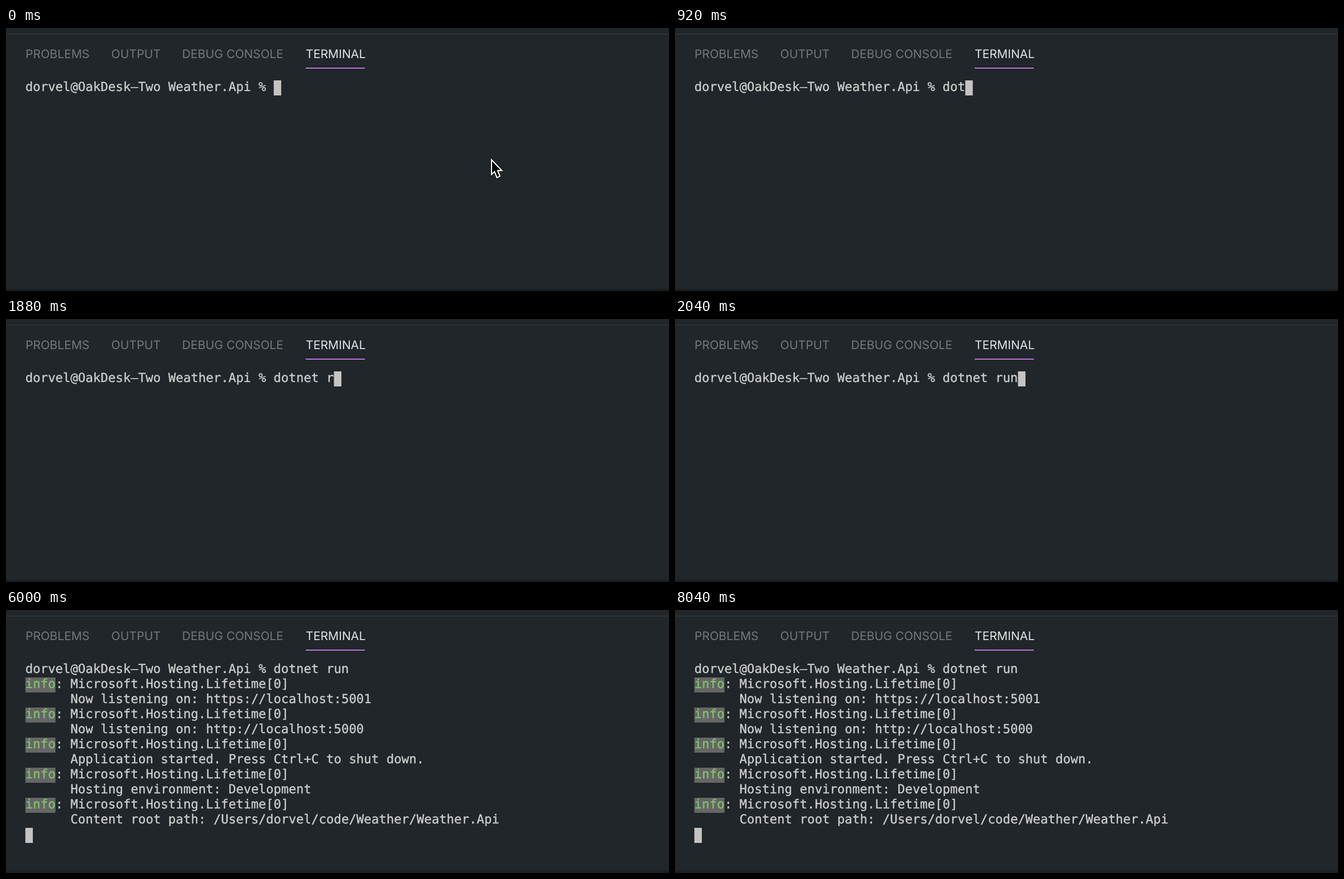
Recreate the animation shown at these times as an HTML page. Size 1188 by 472 pixels, loop 8080 ms.

```html
<!DOCTYPE html>
<html lang="en">
<head>
<meta charset="utf-8">
<title>Terminal</title>
<style>
html, body { margin: 0; width: 100%; height: 100%; overflow: hidden; background: #202629; }
svg { display: block; }
text { white-space: pre; text-rendering: geometricPrecision; }
#tabs text { font: 21.2px Inter, Roboto, sans-serif; fill: #73787a; }
#tabs .on { fill: #e4e5e6; }
#term text {
  font: 22.4px "DejaVu Sans Mono", "Liberation Mono", monospace;
  fill: #cccccc; stroke: #cccccc; stroke-width: 0.4px;
}
#term .info { fill: #82c26c; stroke: #82c26c; }
</style>
</head>
<body>
<svg id="stage" width="1188" height="472" viewBox="0 0 1188 472">
  <rect width="1188" height="472" fill="#202629"/>
  <rect y="10" width="1188" height="2" fill="#2c3235"/>
  <rect y="468" width="1188" height="4" fill="#1b1f22"/>
  <g id="tabs">
    <text x="35" y="54">PROBLEMS</text>
    <text x="188.5" y="54">OUTPUT</text>
    <text x="315.5" y="54">DEBUG CONSOLE</text>
    <text x="537" y="54" class="on">TERMINAL</text>
    <rect x="537" y="71" width="106" height="2" fill="#ba74da"/>
  </g>
  <g id="term">
    <g id="log"></g>
    <rect id="caret" width="13.4" height="27" fill="#c6c4c3"/>
  </g>
  <path id="mouse" d="M871 239V260.5L875.8 256L880.2 267L883.8 265.5L879.4 254.8H886Z"
    fill="#000" stroke="#fff" stroke-width="4" stroke-linejoin="miter" paint-order="stroke"/>
</svg>
<script>
const LOOP = 8080, LEFT = 34.7, TOP = 94, CELL = 13.485, ROW = 27;
const ENTER = 2580, OUTPUT = 6000, FADE_START = 40, FADE_STEPS = 8;
const user = "dorvel";
const prompt = user + "@OakDesk\u2013Two Weather.Api % ";
const command = "dotnet run";
const keyTimes = [40, 580, 920, 1380, 1460, 1540, 1670, 1880, 1960, 2040];
const messages = [
  "Now listening on: https://localhost:5001",
  "Now listening on: http://localhost:5000",
  "Application started. Press Ctrl+C to shut down.",
  "Hosting environment: Development",
  "Content root path: /Users/" + user + "/code/Weather/Weather.Api"
];

const get = id => document.getElementById(id);
const term = get("term"), log = get("log"), caret = get("caret"), mouse = get("mouse");

function add(parent, tag, attrs, text = "") {
  const el = document.createElementNS("http://www.w3.org/2000/svg", tag);
  for (const key in attrs) el.setAttribute(key, attrs[key]);
  el.textContent = text;
  parent.appendChild(el);
  return el;
}

const colX = col => LEFT + col * CELL;
const rowY = row => TOP + row * ROW;

function write(parent, col, row, text, cls = "") {
  return add(parent, "text", { x: colX(col), y: rowY(row) + 19.2, class: cls }, text);
}

const line = write(term, 0, 0, prompt);
term.insertBefore(line, caret);

messages.forEach((message, i) => {
  const row = 1 + i * 2;
  add(log, "rect", { x: LEFT, y: rowY(row), width: 4 * CELL, height: ROW, fill: "#666666" });
  write(log, 0, row, "info", "info");
  write(log, 4, row, ": Microsoft.Hosting.Lifetime[0]");
  write(log, 6, row + 1, message);
});

function draw(t) {
  const typed = keyTimes.filter(k => k <= t).length;
  const done = t >= OUTPUT, entered = t >= ENTER;
  line.textContent = prompt + command.slice(0, typed);
  log.setAttribute("visibility", done ? "visible" : "hidden");
  caret.setAttribute("x", colX(entered ? 0 : prompt.length + typed));
  caret.setAttribute("y", rowY(done ? 11 : entered ? 1 : 0));

  // the pointer fades out in 40 ms steps once typing begins
  const step = t < FADE_START ? 0 : Math.floor((t - FADE_START) / 40) + 1;
  mouse.setAttribute("opacity", Math.max(0, 1 - step / FADE_STEPS));
}

function tick() {
  draw(performance.now() % LOOP);
  requestAnimationFrame(tick);
}
tick();
</script>
</body>
</html>
```
